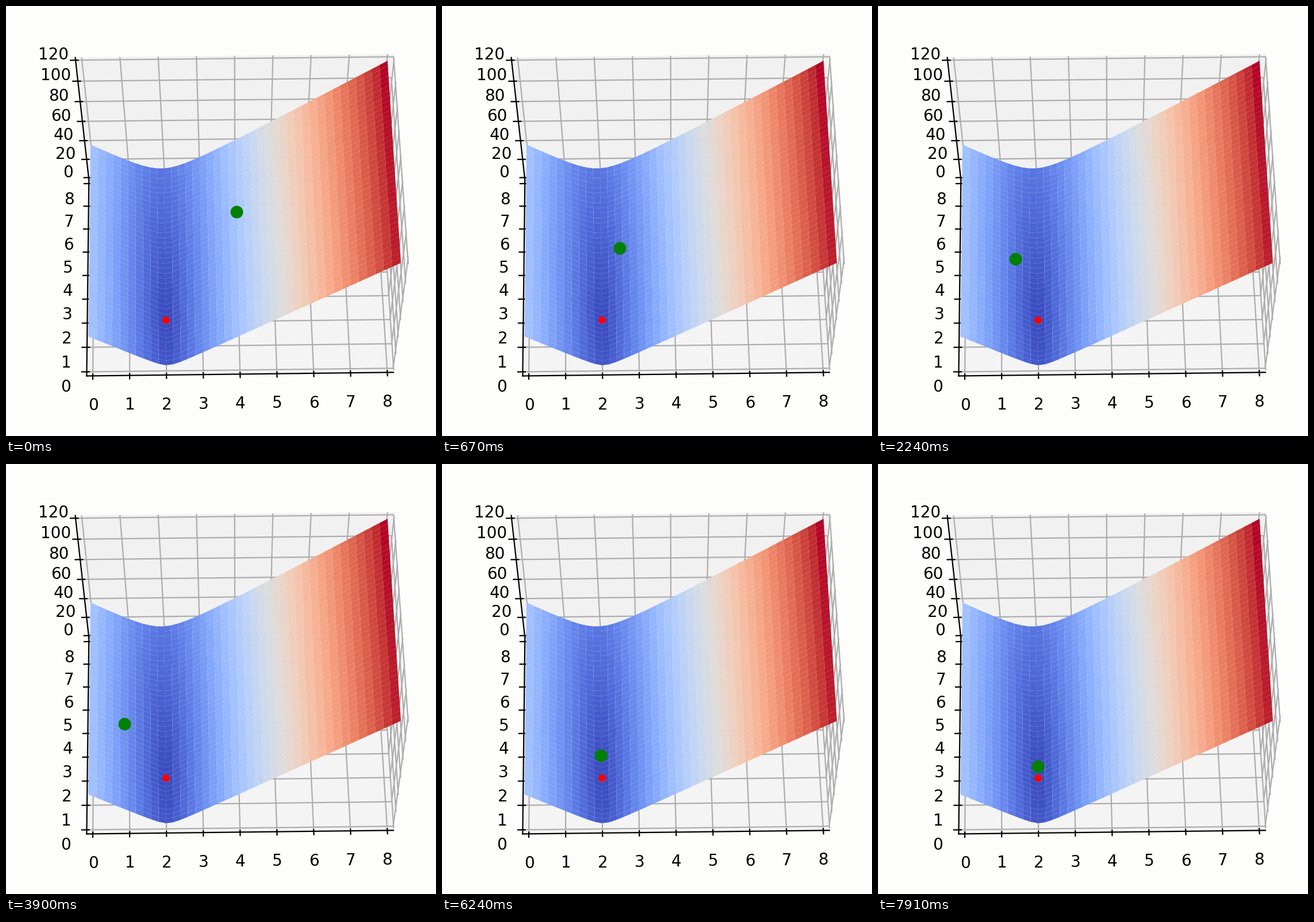
Recreate the animation shown at these times as a matplotlib script. Size 748 px wide and 748 px high, loop 8 s.

```python
import numpy as np
import matplotlib.pyplot as plt
from matplotlib.animation import FuncAnimation
from matplotlib.collections import LineCollection, PolyCollection

SIZE, DPI = 748, 200
LOOP, STEP = 8000, 50
ELEV, AZIM, DIST = np.radians(60), np.radians(-91), 10
CELLS = 40
SPAN = 8.0
PAD = SPAN / 48


def height(x, y):
    """Square root of a narrow, slightly tilted quadratic bowl around (2, 2)."""
    dx, dy = x - 2, y - 2
    return np.sqrt(384 * dx**2 + 11 * dx * dy + 5 * dy**2)


TOP = height(SPAN, SPAN)
LO, HI = -PAD, SPAN + PAD
ZLO, ZHI = -TOP / 48, TOP * 49 / 48

# Camera axes: right, up and towards the eye
RIGHT = np.array([-np.sin(AZIM), np.cos(AZIM), 0])
EYE = np.array([np.cos(ELEV) * np.cos(AZIM),
                np.cos(ELEV) * np.sin(AZIM),
                np.sin(ELEV)])
UP = np.cross(EYE, RIGHT)


def project(x, y, z):
    """Perspective view of the unit cube, in stage pixels."""
    x, y, z = np.broadcast_arrays(x, y, z)
    p = np.stack([x / SPAN, y / SPAN, z / TOP], axis=-1) - 0.5
    w = DIST - p @ EYE
    return np.stack([402.6 + 5221 * (p @ RIGHT) / w,
                     368.8 - 3890.5 * (p @ UP) / w], axis=-1)


def path(*points):
    return project(*np.array(points, float).T)


def ease(t, times, values):
    """Smooth curve through the points that never overshoots them."""
    h = np.diff(times)
    s = np.diff(values) / h
    m = np.concatenate([s[:1], np.zeros(len(s) - 1), s[-1:]])
    same = s[:-1] * s[1:] > 0
    m[1:-1][same] = 2 / (1 / s[:-1][same] + 1 / s[1:][same])
    t = np.clip(t, times[0], times[-1])
    k = min(np.searchsorted(times, t, side="right") - 1, len(h) - 1)
    u = (t - times[k]) / h[k]
    return (values[k] * (1 + 2 * u) * (1 - u)**2
            + values[k + 1] * u * u * (3 - 2 * u)
            + h[k] * u * (1 - u) * (m[k] * (1 - u) - m[k + 1] * u))


fig = plt.figure(figsize=(SIZE / DPI, SIZE / DPI), dpi=DPI, facecolor="#fdfdfc")
ax = fig.add_axes([0, 0, 1, 1])
ax.set_xlim(0, SIZE)
ax.set_ylim(SIZE, 0)
ax.axis("off")

# Panes
panes = [
    path((HI, LO, ZLO), (HI, HI, ZLO), (HI, HI, ZHI), (HI, LO, ZHI)),
    path((LO, HI, ZLO), (HI, HI, ZLO), (HI, HI, ZHI), (LO, HI, ZHI)),
    path((LO, LO, ZLO), (HI, LO, ZLO), (HI, HI, ZLO), (LO, HI, ZLO)),
]
ax.add_collection(PolyCollection(panes, facecolors=["0.97", "0.947", "0.957"],
                                 linewidths=0, zorder=1))

# Grid, ticks and labels
grid, ticks = [], []
OUT, IN = SPAN / 60, SPAN / 120
GAP = 0.0738
FAR, DROP = GAP * SPAN, GAP * TOP


def label(value, x, y, z):
    ax.text(*project(x, y, z), str(value), fontsize=10, family="DejaVu Sans",
            ha="center", va="top", zorder=5)


for n in range(9):
    grid.append(path((n, LO, ZLO), (n, HI, ZLO), (n, HI, ZHI)))
    grid.append(path((LO, n, ZLO), (HI, n, ZLO), (HI, n, ZHI)))
    ticks.append(path((n, LO - OUT, ZLO), (n, LO + IN, ZLO)))
    ticks.append(path((LO - OUT, n, ZLO), (LO + IN, n, ZLO)))
    label(n, n, LO - FAR, ZLO - DROP)
    label(n, LO - FAR, n, ZLO - DROP)

for z in range(0, 121, 20):
    grid.append(path((LO, HI, z), (HI, HI, z), (HI, LO, z)))
    ticks.append(path((LO - OUT, HI, z), (LO + IN, HI, z)))
    label(z, LO - FAR, HI + FAR, z)

axes = [path((LO, LO, ZLO), (HI, LO, ZLO)),
        path((LO, LO, ZLO), (LO, HI, ZLO)),
        path((LO, HI, ZLO), (LO, HI, ZHI))]
ax.add_collection(LineCollection(grid, colors="#adadad", linewidths=0.8, zorder=2))
ax.add_collection(LineCollection(axes + ticks, colors="black", linewidths=0.8,
                                 capstyle="projecting", zorder=3))

# Surface
side = np.linspace(0, SPAN, CELLS + 1)
gx, gy = np.meshgrid(side, side)
gz = height(gx, gy)
pts = project(gx, gy, gz)


def corners(a):
    return np.stack([a[:-1, :-1], a[:-1, 1:], a[1:, 1:], a[1:, :-1]], axis=2)


quads = corners(pts).reshape(-1, 4, 2)
level = corners(gz).mean(axis=2).ravel()
level = (level - level.min()) / (level.max() - level.min())
ax.add_collection(PolyCollection(quads, facecolors=plt.get_cmap("coolwarm")(level),
                                 edgecolors="none", linewidths=0,
                                 antialiaseds=True, zorder=4))

# Minimum and moving point
ax.scatter(*project(2, 2, 0), s=4.6**2, color="red", linewidths=0, zorder=6)
dot = ax.scatter(0, 0, s=7.9**2, color="green", linewidths=0, zorder=7)

TIMES = np.array([0, 0.65, 1.1, 2.2, 3.9, 6.2, 7.9])
XS = np.array([4, 2.52, 1.82, 1.40, 0.905, 1.968, 2.0])
YS = np.array([5, 4.57, 4.55, 4.15, 3.53, 2.875, 2.44])


def update(i):
    t = i * STEP / 1000
    x, y = ease(t, TIMES, XS), ease(t, TIMES, YS)
    dot.set_offsets([project(x, y, height(x, y))])
    return dot,


anim = FuncAnimation(fig, update, frames=LOOP // STEP, interval=STEP,
                     init_func=lambda: update(0), repeat=True, repeat_delay=0)
plt.show()
```
